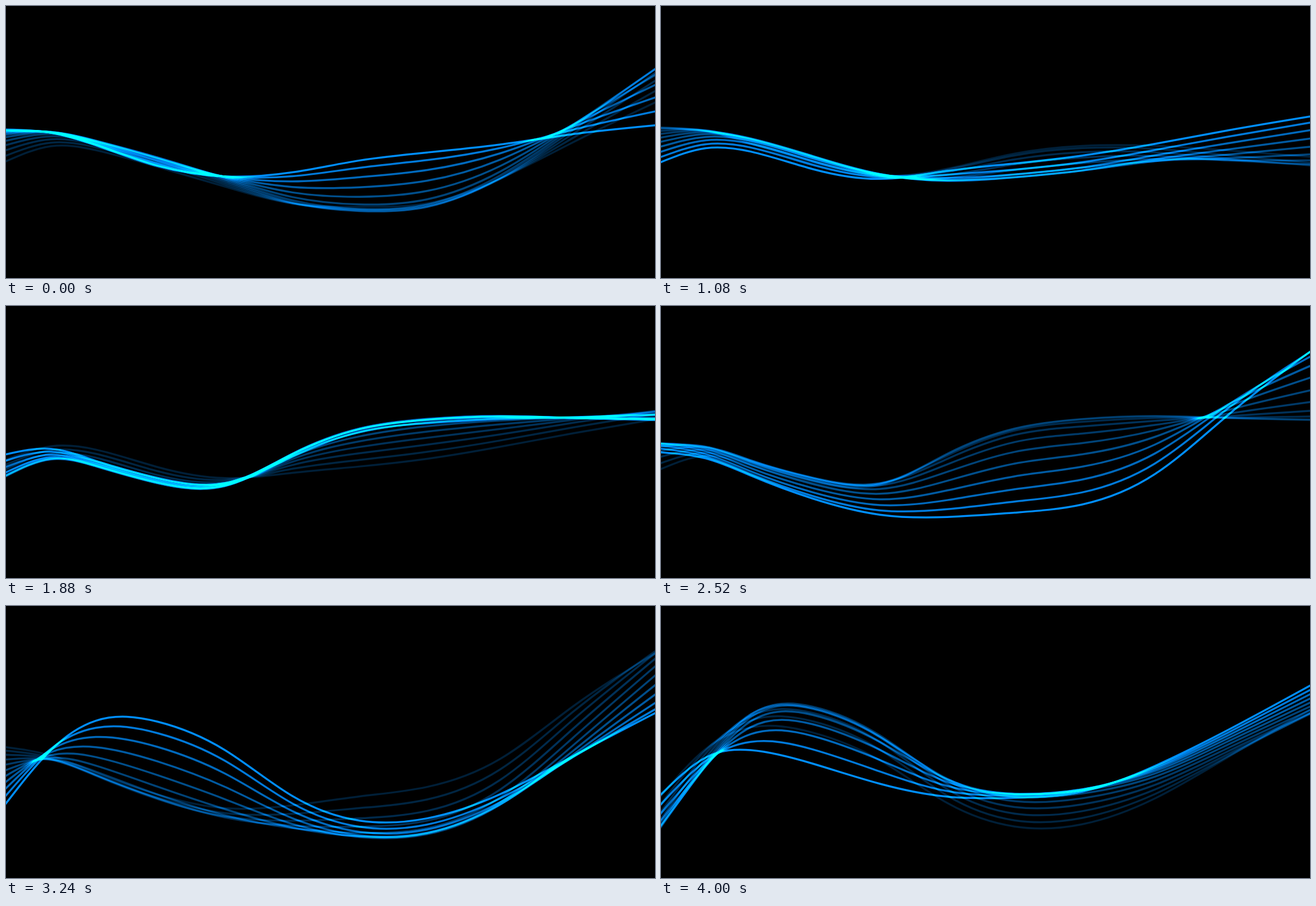
An HTML page with a canvas for the animation above (4.04 s loop, 1156 by 485 pixels).

```html
<!DOCTYPE html>
<html lang="en">
<head>
<meta charset="utf-8">
<title>Blue wave</title>
<style>
  html, body { margin: 0; width: 100%; height: 100%; overflow: hidden; background: #000; }
  canvas { display: block; width: 1156px; height: 485px; }
</style>
</head>
<body>
<canvas id="stage" width="1156" height="485"></canvas>
<script>
const ctx = document.getElementById('stage').getContext('2d');
const LOOP = 4040, TICK = 40;
const ECHOES = 11, LAG = 84, DECAY = 0.86;
const START = -840, END = 4000;

// Poses of the wave, evenly spaced from START to END: heights at the knots.
const knots = [0, 80, 160, 270, 390, 510, 630, 750, 880, 1010, 1156];
const poses = [
  [277, 250, 257, 287, 322, 352, 358, 352, 308, 243, 172],
  [235, 226, 240, 270, 307, 342, 356, 347, 297, 213, 112],
  [221, 226, 248, 285, 304, 299, 280, 266, 249, 225, 203],
  [218, 222, 242, 275, 302, 294, 270, 257, 258, 270, 283],
  [245, 230, 238, 269, 300, 312, 306, 294, 276, 262, 246],
  [288, 261, 268, 299, 312, 286, 267, 252, 233, 211, 189],
  [300, 272, 286, 316, 321, 265, 223, 205, 198, 199, 201],
  [253, 251, 275, 306, 318, 278, 237, 222, 209, 194, 178],
  [251, 266, 297, 335, 359, 353, 336, 319, 270, 178, 86],
  [289, 272, 289, 328, 367, 396, 409, 402, 348, 244, 118],
  [344, 255, 211, 217, 267, 346, 389, 385, 340, 269, 188],
  [394, 284, 199, 185, 235, 308, 339, 333, 303, 246, 178],
  [336, 270, 257, 281, 317, 340, 342, 331, 285, 221, 142]
];
const step = (END - START) / (poses.length - 1);
const poseTimes = poses.map((_, i) => START + i * step);

// Slopes of the natural cubic spline through (xs, ys).
function slopes(xs, ys) {
  const n = xs.length, upper = [], rhs = [];
  for (let i = 0; i < n; i++) {
    const a = i ? 1 / (xs[i] - xs[i - 1]) : 0;
    const b = i < n - 1 ? 1 / (xs[i + 1] - xs[i]) : 0;
    const left = i ? (ys[i] - ys[i - 1]) * a * a : 0;
    const right = i < n - 1 ? (ys[i + 1] - ys[i]) * b * b : 0;
    const pivot = 2 * (a + b) - (i ? a * upper[i - 1] : 0);
    upper[i] = b / pivot;
    rhs[i] = (3 * (left + right) - (i ? a * rhs[i - 1] : 0)) / pivot;
  }
  for (let i = n - 2; i >= 0; i--) rhs[i] -= upper[i] * rhs[i + 1];
  return rhs;
}

const tracks = knots.map((_, k) => {
  const ys = poses.map(pose => pose[k]);
  return { ys, ms: slopes(poseTimes, ys) };
});

function waveAt(time) {
  const pos = Math.min(Math.max((time - START) / step, 0), poses.length - 1);
  const i = Math.min(Math.floor(pos), poses.length - 2);
  const u = pos - i, v = 1 - u;
  return tracks.map(({ ys, ms }) =>
    v * v * (1 + 2 * u) * ys[i] + u * u * (3 - 2 * u) * ys[i + 1] +
    u * v * step * (v * ms[i] - u * ms[i + 1]));
}

function strokeWave(ys) {
  const ms = slopes(knots, ys), last = knots.length - 1, over = 6;
  ctx.beginPath();
  ctx.moveTo(-over, ys[0] - over * ms[0]);
  ctx.lineTo(0, ys[0]);
  for (let i = 0; i < last; i++) {
    const x0 = knots[i], x1 = knots[i + 1], third = (x1 - x0) / 3;
    ctx.bezierCurveTo(x0 + third, ys[i] + third * ms[i],
      x1 - third, ys[i + 1] - third * ms[i + 1], x1, ys[i + 1]);
  }
  ctx.lineTo(knots[last] + over, ys[last] + over * ms[last]);
  ctx.stroke();
}

function draw(time) {
  ctx.globalCompositeOperation = 'source-over';
  ctx.globalAlpha = 1;
  ctx.fillStyle = '#000';
  ctx.fillRect(0, 0, 1156, 485);
  ctx.globalCompositeOperation = 'lighter';
  ctx.strokeStyle = 'rgb(0,142,255)';
  ctx.lineWidth = 3.5;
  for (let k = ECHOES - 1; k >= 0; k--) {
    ctx.globalAlpha = DECAY ** k;
    strokeWave(waveAt(time - k * LAG));
  }
}

const begin = performance.now();
function frame() {
  const elapsed = (performance.now() - begin) % LOOP;
  draw(Math.floor(elapsed / TICK) * TICK);
  requestAnimationFrame(frame);
}
frame();
</script>
</body>
</html>
```
